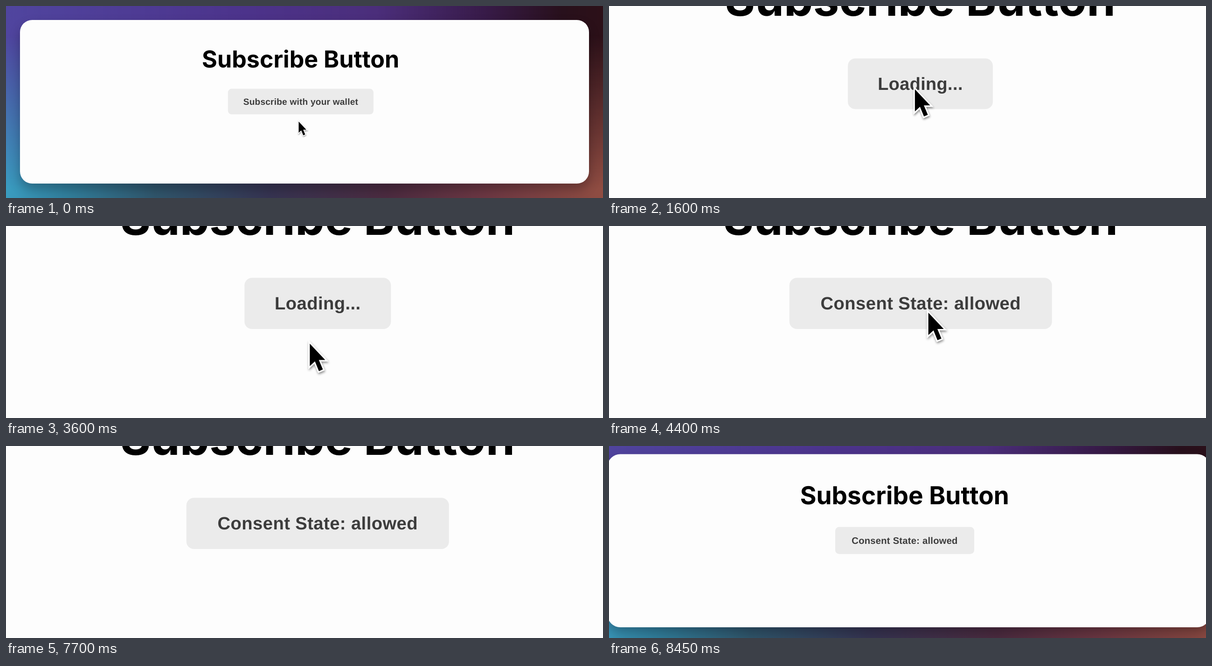
These frames come from a looping animation (1280 px wide and 412 px high, 8.5 s). An HTML page:

```html
<!DOCTYPE html>
<html lang="en">
<head>
<meta charset="utf-8">
<title>Subscribe Button</title>
<style>
  html, body { margin: 0; width: 100%; height: 100%; overflow: hidden; background: #fdfdfd; }
  svg { display: block; width: 100vw; height: 100vh; }
  .title { font: 700 50.2px Inter, sans-serif; fill: #000; }
  .label { font: 700 19.1px "Liberation Sans", Arial, sans-serif; letter-spacing: .21px; fill: #3c3c3c; }
  text { text-anchor: middle; text-rendering: geometricPrecision; }
</style>
</head>
<body>
<svg viewBox="0 0 1280 412">
  <defs>
    <linearGradient id="top">
      <stop offset="0" stop-color="#50459f"/>
      <stop offset=".4" stop-color="#4c338b"/>
      <stop offset=".62" stop-color="#4b2e7b"/>
      <stop offset=".8" stop-color="#381b49"/>
      <stop offset=".93" stop-color="#28101c"/>
      <stop offset="1" stop-color="#2c1018"/>
    </linearGradient>
    <linearGradient id="bottom">
      <stop offset="0" stop-color="#3a9cc0"/>
      <stop offset=".1" stop-color="#31809e"/>
      <stop offset=".25" stop-color="#30566c"/>
      <stop offset=".44" stop-color="#363452"/>
      <stop offset=".64" stop-color="#4c2b40"/>
      <stop offset=".8" stop-color="#6c3743"/>
      <stop offset="1" stop-color="#904d42"/>
    </linearGradient>
    <linearGradient id="fade" x2="0" y2="1">
      <stop offset=".15" stop-color="#000"/>
      <stop offset=".95" stop-color="#fff"/>
    </linearGradient>
    <mask id="lower"><rect width="1280" height="412" fill="url(#fade)"/></mask>
    <filter id="blur" x="-10%" y="-20%" width="120%" height="140%"><feGaussianBlur stdDeviation="12"/></filter>
    <filter id="drop" x="-50%" y="-50%" width="200%" height="200%">
      <feDropShadow dx=".5" dy="1.5" stdDeviation="1.2" flood-opacity=".45"/>
    </filter>
  </defs>
  <g id="scene">
    <rect width="1280" height="412" fill="url(#top)"/>
    <rect width="1280" height="412" fill="url(#bottom)" mask="url(#lower)"/>
    <rect x="30" y="42" width="1220" height="351" rx="26" opacity=".25" filter="url(#blur)"/>
    <rect x="30" y="30" width="1220" height="351" rx="26" fill="#fdfdfd"/>
    <text class="title" x="631.7" y="131.5">Subscribe Button</text>
    <rect id="button" y="177.6" height="54.9" rx="8" fill="#ebebeb"/>
    <text id="label" class="label" x="631.9" y="211.6"></text>
    <g id="cursor">
      <path d="M1.5 3.5V27.5L7 22.5L11.3 33L15.5 31.2L11.2 21H18Z" stroke="#fff" stroke-width="3"
            paint-order="stroke" filter="url(#drop)"/>
    </g>
  </g>
</svg>
<script>
const LOOP = 8500, STEP = 50, CENTER = 631.9;
const [scene, button, label, cursor] =
  ['scene', 'button', 'label', 'cursor'].map(id => document.getElementById(id));

const IDLE = ['Subscribe with your wallet', 312];
const LOADING = ['Loading...', 157];
const DONE = ['Consent State: allowed', 281.5];
const states = [[0, IDLE], [1200, LOADING], [3750, DONE], [6150, LOADING], [6550, DONE]];

// time, x, y of the pointer tip
const path = [
  [0, 626, 244.5], [600, 625.5, 241.5], [900, 625, 224.5], [1050, 624.5, 212], [1350, 624.5, 207.5],
  [1850, 624.5, 207.5], [2450, 596.2, 208], [3250, 596.2, 208], [3700, 628, 250],
  [4150, 638, 229], [4400, 638.6, 211.5], [5350, 638.6, 207], [LOOP, 638.6, 207]
];

const clamp = v => Math.min(1, Math.max(0, v));

// Critically damped spring from 0 to 1
function spring(t, start) {
  const u = Math.max(0, t - start) * 0.00606;
  return 1 - (1 + u) * Math.exp(-u);
}

// Monotone cubic interpolation along one axis of the path
function along(t, axis) {
  const slope = i => (path[i + 1][axis] - path[i][axis]) / (path[i + 1][0] - path[i][0]);
  const tangent = i => {
    if (i === 0 || i === path.length - 1) return 0;
    const a = slope(i - 1), b = slope(i);
    return a * b > 0 ? 2 * a * b / (a + b) : 0;
  };
  let i = 0;
  while (i < path.length - 2 && t >= path[i + 1][0]) i++;
  const span = path[i + 1][0] - path[i][0], s = (t - path[i][0]) / span, r = 1 - s;
  return path[i][axis] * r * r * (1 + 2 * s) + path[i + 1][axis] * s * s * (3 - 2 * s)
    + span * s * r * (r * tangent(i) - s * tangent(i + 1));
}

const press = (t, start) => 0.21 * Math.sin(Math.PI * clamp((t - start) / 300)) ** 2;

function draw(t) {
  const zoom = spring(t, 640) - spring(t, 7700);
  scene.setAttribute('transform', `translate(${-595.5 * zoom} ${-244 * zoom}) scale(${1 + zoom})`);

  const [text, width] = states.filter(([start]) => t >= start).pop()[1];
  label.textContent = text;
  button.setAttribute('x', CENTER - width / 2);
  button.setAttribute('width', width);

  const size = 1 - press(t, 900) - press(t, 5960);
  cursor.setAttribute('transform', `translate(${along(t, 1)} ${along(t, 2)}) scale(${size})`);
  cursor.setAttribute('opacity', 1 - clamp((t - 6500) / 250));
}

const origin = performance.now();
function tick() {
  const t = (performance.now() - origin) % LOOP;
  draw(Math.floor(t / STEP) * STEP);
  requestAnimationFrame(tick);
}
draw(0);
requestAnimationFrame(tick);
</script>
</body>
</html>
```
